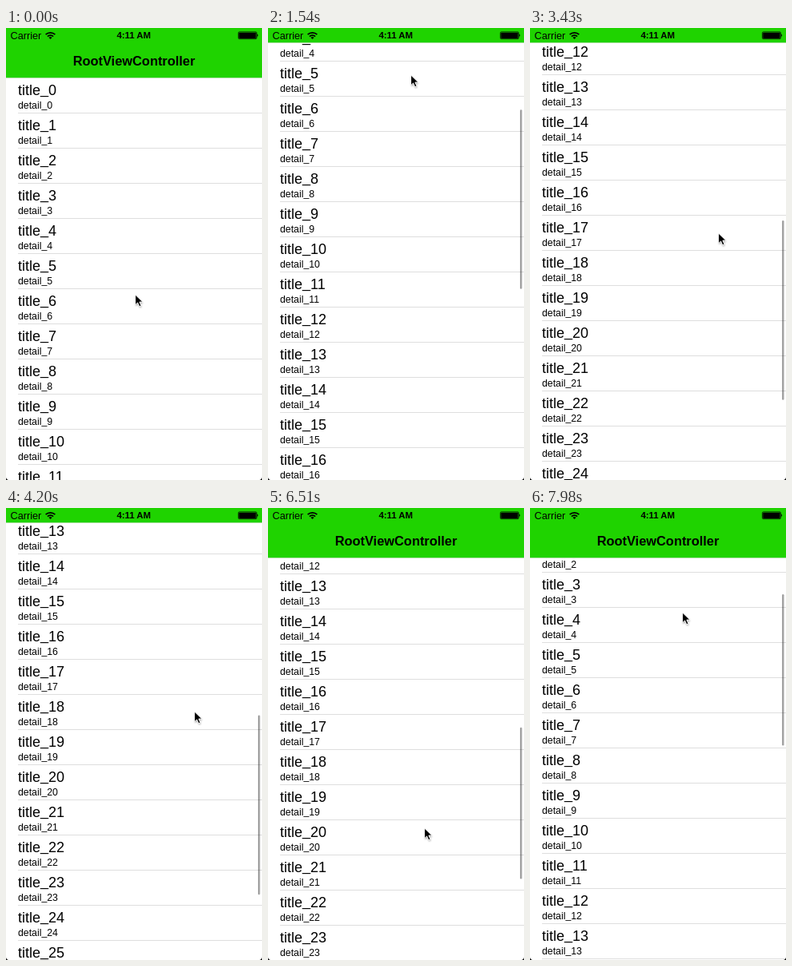
Write an HTML page that moves like this. It is 320 by 566 pixels and loops after 8 s.

```html
<!DOCTYPE html>
<html lang="en">
<head>
<meta charset="utf-8">
<title>Scrolling list</title>
<style>
  html, body { margin: 0; width: 100%; height: 100%; overflow: hidden; background: #fff; }
  svg { display: block; width: 100vw; height: 100vh; }
  text { font-family: "Liberation Sans", Arial, sans-serif; fill: #000; }
  .title { font-size: 18px; }
  .detail { font-size: 12.3px; }
  .bold { font-weight: 700; text-anchor: middle; }
</style>
</head>
<body>
<svg viewBox="0 0 320 566" preserveAspectRatio="none">
  <defs>
    <filter id="soft" x="-50%" y="-50%" width="200%" height="200%">
      <feGaussianBlur stdDeviation="1.1"/>
    </filter>
  </defs>
  <rect width="320" height="566" fill="#fff"/>
  <g id="list"></g>
  <rect id="thumb" x="315" width="2.5" rx="1.25" fill="#000" fill-opacity=".36"/>
  <g id="bar">
    <rect y="-50" width="320" height="112" fill="#1fd300"/>
    <rect y="62" width="320" height="1" fill="#a9dfa0"/>
    <text id="heading" class="bold" x="160" y="47" font-size="16.4">RootViewController</text>
  </g>
  <g id="status">
    <text x="5.5" y="13.5" font-size="12.7">Carrier</text>
    <g fill="none" stroke="#000" stroke-width="1.7">
      <path d="M49.6 8.2A8.4 8.4 0 0 1 61.4 8.2"/>
      <path d="M51.9 10.6A5.1 5.1 0 0 1 59.1 10.6"/>
    </g>
    <path d="M53.5 11.9A2.9 2.9 0 0 1 57.5 11.9L55.5 14Z"/>
    <text class="bold" x="159.7" y="13.3" font-size="11.4">4:11 AM</text>
    <rect x="290.4" y="4.9" width="23" height="8.8" rx="1.4" fill="none" stroke="#000" stroke-width=".8"/>
    <rect x="291.2" y="5.7" width="21.4" height="7.2" rx=".6"/>
    <path d="M314.2 7.6Q316.2 9.3 314.2 11Z"/>
  </g>
  <path d="M0 562.5Q.4 565.6 3.5 566H0ZM320 562.5Q319.6 565.6 316.5 566H320Z"/>
  <g id="cursor">
    <g transform="translate(.6 1) scale(.88)">
      <path d="M0 0V14.5L3.4 11.3 5.8 16.8 8.4 15.7 6 10.3H10.6Z" transform="translate(.6 1.8)" opacity=".4" filter="url(#soft)"/>
      <path d="M0 0V14.5L3.4 11.3 5.8 16.8 8.4 15.7 6 10.3H10.6Z" stroke="#fff" stroke-width="1.1"/>
    </g>
  </g>
</svg>
<script>
const LOOP = 8000, STEP = 70, ROWS = 30, ROW_H = 44, TOP = 63, NAV = 44, END = 816;
const $ = id => document.getElementById(id);

const ease = {
  line: p => p,
  soft: p => p * p * (3 - 2 * p),
  out: p => 1 - (1 - p) ** 2,
  coast: p => 1 - (1 - p) ** 1.4
};

// Each key: time, values..., easing used to arrive there
const scrollKeys = [
  [0, 0], [630, 0], [1470, 239, "soft"], [1680, 242, "out"],
  [2520, 242], [2800, 390, "line"], [3500, 578, "out"], [4200, 621, "out"],
  [4410, 621], [4620, 705, "line"], [5180, END, "out"],
  [5740, END], [6510, 552, "soft"], [7350, 552], [7980, 114, "coast"]
];
const cursorKeys = [
  [0, 161, 333], [630, 161, 333], [1470, 178, 58, "soft"],
  [2240, 178, 58], [2520, 188, 530, "soft"], [2800, 191, 442, "line"],
  [3500, 235, 254, "out"], [4410, 235, 254], [4620, 237, 204, "line"],
  [5250, 237, 204], [5530, 235, 136, "soft"], [5740, 235, 136],
  [6510, 195, 400, "soft"], [7000, 195, 400], [7350, 188, 92, "soft"],
  [7560, 190, 130, "out"]
];
const thumbKeys = [
  [0, 0], [560, 0], [700, 1], [5250, 1], [5530, 0], [5670, 0], [5810, 1]
];

function sample(keys, t, col = 1) {
  const i = keys.findIndex(k => k[0] > t);
  if (i < 0) return keys[keys.length - 1][col];
  const a = keys[i - 1], b = keys[i];
  const name = b[b.length - 1];
  const f = typeof name === "string" ? ease[name] : ease.line;
  return a[col] + (b[col] - a[col]) * f((t - a[0]) / (b[0] - a[0]));
}

const clamp = (v, lo, hi) => Math.min(hi, Math.max(lo, v));

function add(parent, tag, attrs, text) {
  const el = document.createElementNS("http://www.w3.org/2000/svg", tag);
  for (const k in attrs) el.setAttribute(k, attrs[k]);
  if (text) el.textContent = text;
  parent.append(el);
  return el;
}

// The underscore sits a little closer to the baseline than the font draws it
function label(kind, n, y) {
  const el = add(list, "text", { class: kind, x: 15, y }, kind);
  add(el, "tspan", { dy: "-.06em" }, "_");
  add(el, "tspan", { dy: ".06em" }, String(n));
}

const list = $("list");
for (let i = 0; i < ROWS; i++) {
  add(list, "rect", { x: 15, y: TOP + i * ROW_H + 43, width: 305, height: 1, fill: "#dedede" });
}
const pressed = add(list, "rect", { y: TOP + 6 * ROW_H - 1, width: 320, height: 45, fill: "#d9d9d9" });
for (let i = 0; i < ROWS; i++) {
  const y = TOP + i * ROW_H;
  label("title", i, y + 20.5);
  label("detail", i, y + 37.5);
}

function draw(time) {
  const t = Math.floor(time / STEP) * STEP;
  const s = Math.round(sample(scrollKeys, t));
  const hidden = clamp(t < 5600 ? s : NAV - (END - s), 0, NAV);
  const view = 503 + hidden, ratio = view / (ROWS * ROW_H);

  list.setAttribute("transform", `translate(0 ${-s})`);
  pressed.setAttribute("visibility", t >= 420 && t < 630 ? "visible" : "hidden");

  $("bar").setAttribute("transform", `translate(0 ${-hidden})`);
  $("heading").setAttribute("opacity", 1 - hidden / NAV);

  const thumb = $("thumb");
  thumb.setAttribute("y", 64.5 - hidden + ratio * (s - hidden));
  thumb.setAttribute("height", view * ratio - 2);
  thumb.setAttribute("opacity", sample(thumbKeys, t));

  const x = Math.round(sample(cursorKeys, t, 1)), y = Math.round(sample(cursorKeys, t, 2));
  $("cursor").setAttribute("transform", `translate(${x} ${y})`);
}

const start = performance.now();
function tick() {
  draw((performance.now() - start) % LOOP);
  requestAnimationFrame(tick);
}
tick();
</script>
</body>
</html>
```
